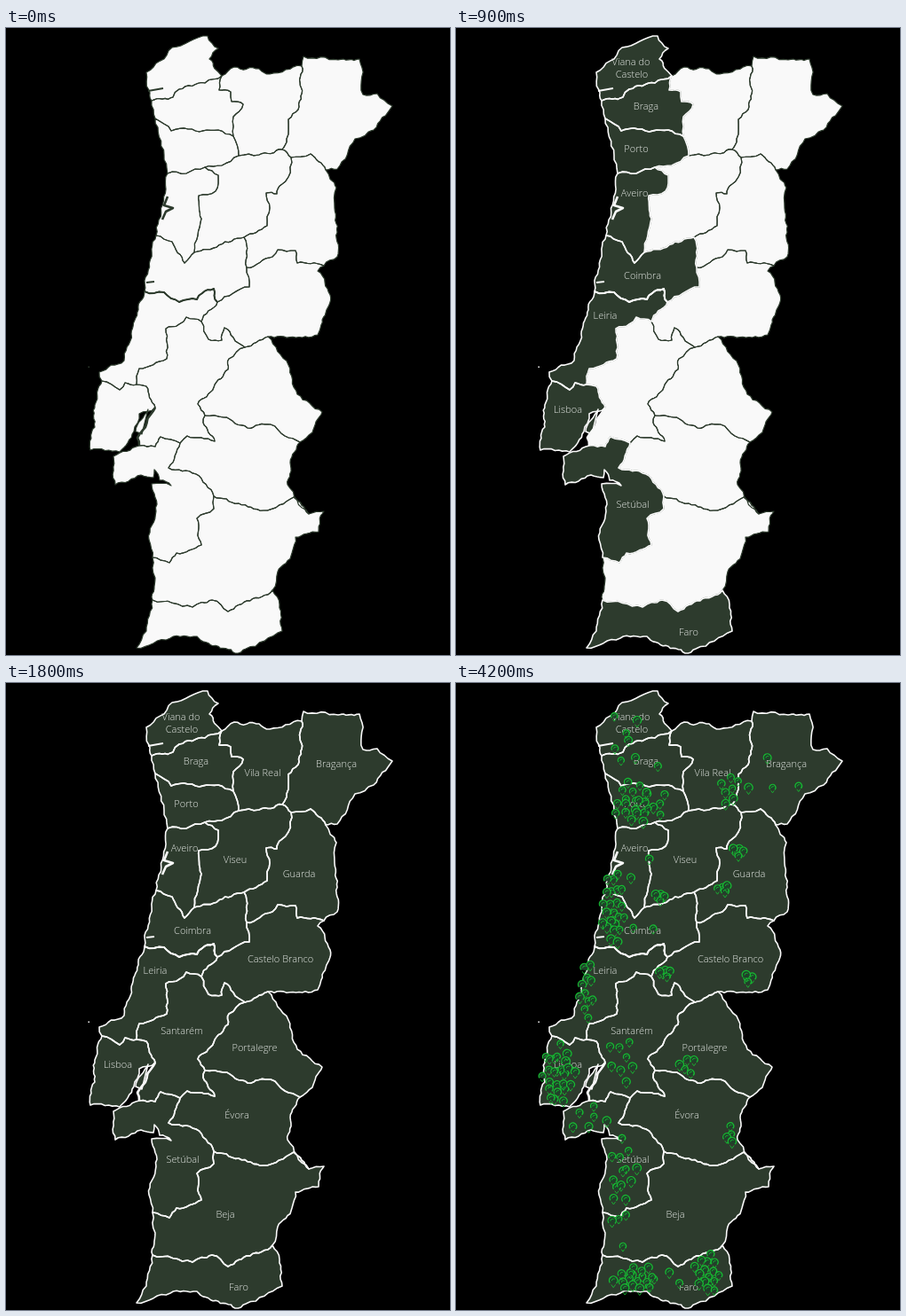
Write an HTML page with a canvas that moves like this. It is 500 px wide and 707 px high and loops after 4.5 s.

```html
<!DOCTYPE html>
<html lang="pt">
<head>
<meta charset="utf-8">
<style>
  html, body { margin: 0; width: 100%; height: 100%; overflow: hidden; background: #000; }
  canvas { display: block; }
</style>
</head>
<body>
<canvas id="stage" width="500" height="707"></canvas>
<script>
const ctx = document.getElementById('stage').getContext('2d');
const DARK = '#2d3b2d', LIGHT = '#f9f9f9', GREEN = '#17b832';
const STEP = 300, STEPS = 15;
const arcs = {}, regions = [], waters = [], pins = [];

const parse = text => text.split(' ').map(p => p.split(',').map(Number));
const same = (a, b) => a[0] === b[0] && a[1] === b[1];

// Splits a segment again and again, shifting each midpoint sideways a little.
function roughen([x0, y0], [x1, y1]) {
  const length = Math.hypot(x1 - x0, y1 - y0);
  if (length < 6) return [[x1, y1]];
  const shift = Math.sin(x0 * 12.9 + y1 * 78.2) * Math.min(0.13, 1.6 / length);
  const mid = [(x0 + x1) / 2 - (y1 - y0) * shift, (y0 + y1) / 2 + (x1 - x0) * shift];
  return [...roughen([x0, y0], mid), ...roughen(mid, [x1, y1])];
}

function arc(name, text) {
  const points = parse(text);
  arcs[name] = points.flatMap((p, i) => i ? roughen(points[i - 1], p) : [p]);
}

function toPath(points) {
  const path = new Path2D();
  points.forEach(([x, y]) => path.lineTo(x, y));
  return path;
}

// Joins arcs into one outline, turning each to continue the last.
function region(step, names, ...labels) {
  const outline = [];
  for (const name of names.split(' ')) {
    const points = arcs[name], end = outline[outline.length - 1];
    outline.push(...(end && !same(end, points[0]) ? [...points].reverse() : points));
  }
  const path = toPath(outline);
  path.closePath();
  regions.push({ step, path, labels });
}

// Rivers and inlets, which turn light together with their district.
const water = (step, width, points) => waters.push({ step, width, path: toPath(points) });

// Spreads pins over an ellipse on a golden-angle spiral, dealt out over the steps.
function scatter(first, last, count, x, y, rx, ry) {
  for (let i = 0; i < count; i++) {
    const angle = i * 2.4 + x, far = Math.sqrt((i + 0.5) / count);
    pins.push({
      step: first + i % (last - first + 1),
      x: x + rx * far * Math.cos(angle),
      y: y + ry * far * Math.sin(angle),
      r: 3.5 + i * 0.618 % 1 * 1.3
    });
  }
}
const early = (...cluster) => scatter(7, 9, ...cluster);
const late = (...cluster) => scatter(10, 14, ...cluster);

// Coast and frontier
arc('vianaSea', '164,82 161,70 158,50 187,22 227,9 239,23 229,35 243,54');
arc('vilaTop', '243,54 257,44 285,46 297,52 333,43');
arc('bragancaTop', '333,43 335,32 374,36 398,35 402,75 418,74 435,88 414,115 393,125 373,159 360,160');
arc('guardaEast', '360,160 372,180 370,203 373,258 358,268');
arc('casteloEast', '358,268 351,274 365,301 351,346 295,348');
arc('portalegreEast', '295,348 318,380 328,413 356,433 345,456 331,467');
arc('evoraEast', '331,467 320,490 317,515 341,548');
arc('bejaEast', '300,634 306,613 322,592 326,574 352,568 358,545 341,548');
arc('faroSea', '300,634 308,650 311,680 270,700 258,705 215,686 185,688 147,699 158,680 165,645');
arc('bejaSea', '165,597 168,620 165,645');
arc('setubalSea', '165,597 161,577 169,545 164,514 186,516 173,510 167,498 166,507 152,504 123,515 121,483 150,471');
arc('lisboaSea', '168,428 150,435 144,455 128,478 95,476 100,450 100,425 108,398');
arc('leiriaSea', '108,398 105,388 133,375 141,345 156,297');
arc('coimbraSea', '156,297 169,234');
arc('aveiroSea', '169,234 182,164');
arc('portoSea', '182,164 178,143 168,102');
arc('bragaSea', '168,102 164,82');

// Inner borders
arc('vianaBraga', '164,82 188,78 195,69 224,62 243,54');
arc('bragaVila', '243,54 240,70 253,72 254,83 267,86 256,100 256,122');
arc('bragaPorto', '168,102 186,116 205,114 239,115 256,122');
arc('portoVila', '256,122 262,144');
arc('portoViseu', '224,157 243,155 262,144');
arc('portoAveiro', '182,164 203,164 224,157');
arc('vilaViseu', '262,144 285,143 311,137');
arc('vilaBraganca', '333,43 329,92 318,103 316,125 311,137');
arc('viseuBraganca', '311,137 321,146');
arc('guardaBraganca', '321,146 343,142 360,160');
arc('viseuGuarda', '321,146 318,168 305,187 293,186 297,203 294,223 268,236');
arc('aveiroViseu', '224,157 239,166 236,184 217,189 220,215 212,253');
arc('aveiroCoimbra', '169,234 187,241 201,265 212,253');
arc('coimbraViseu', '212,253 268,236');
arc('guardaCoimbra', '268,236 271,270');
arc('guardaCastelo', '271,270 300,258 306,250 326,251 328,265 358,268');
arc('coimbraCastelo', '271,270 274,292 238,309');
arc('coimbraLeiria', '156,297 178,298 195,309 215,306 221,299 234,294 238,309');
arc('leiriaCastelo', '238,309 220,331');
arc('leiriaSantarem', '220,331 203,326 195,334 180,339 181,373 150,384 147,402');
arc('leiriaLisboa', '108,398 128,408 134,400 147,402');
arc('lisboaSantarem', '147,402 158,404 168,428');
arc('tejo', '168,428 148,462 150,471');
arc('island', '160,430 146,455 153,458');
arc('casteloSantarem', '220,331 228,351 243,352 246,338 256,349 269,360');
arc('casteloPortalegre', '269,360 295,348');
arc('santaremPortalegre', '224,437 216,424 250,385 251,373 269,360');
arc('santaremSetubal', '150,471 168,472 174,461 196,468');
arc('santaremEvora', '196,468 204,460 235,466 222,445 224,437');
arc('portalegreEvora', '224,437 245,439 272,451 298,447 314,460 331,467');
arc('setubalEvora', '196,468 183,496 214,503 234,528');
arc('setubalBeja', '234,528 234,542 215,553 220,583 192,592 184,603 165,597');
arc('evoraBeja', '234,528 290,544 324,529 341,548');
arc('bejaFaro', '165,645 210,653 232,645 250,658 300,634');

region(1, 'bragaPorto portoVila portoViseu portoAveiro portoSea', ['Porto', 203, 137]);
region(1, 'leiriaLisboa lisboaSantarem lisboaSea', ['Lisboa', 126, 431]);
region(1, 'island');
region(1, 'bejaFaro faroSea', ['Faro', 262, 682]);
region(2, 'vianaSea vianaBraga', ['Viana do', 197, 39], ['Castelo', 198, 53]);
region(2, 'vianaBraga bragaVila bragaPorto bragaSea', ['Braga', 214, 89]);
region(2, 'portoAveiro aveiroViseu aveiroCoimbra aveiroSea', ['Aveiro', 201, 187]);
region(3, 'aveiroCoimbra coimbraViseu guardaCoimbra coimbraCastelo coimbraLeiria coimbraSea', ['Coimbra', 210, 280]);
region(3, 'coimbraLeiria leiriaCastelo leiriaSantarem leiriaLisboa leiriaSea', ['Leiria', 168, 325]);
region(3, 'santaremSetubal setubalEvora setubalBeja setubalSea', ['Setúbal', 199, 538]);
region(4, 'vilaViseu viseuBraganca viseuGuarda coimbraViseu aveiroViseu portoViseu', ['Viseu', 258, 200]);
region(4, 'leiriaSantarem lisboaSantarem tejo santaremSetubal santaremEvora santaremPortalegre casteloSantarem', ['Santarém', 198, 393]);
region(4, 'setubalBeja bejaSea bejaFaro bejaEast evoraBeja', ['Beja', 247, 600]);
region(5, 'vilaTop vilaBraganca vilaViseu portoVila bragaVila', ['Vila Real', 289, 102]);
region(5, 'guardaCastelo casteloEast casteloPortalegre casteloSantarem leiriaCastelo coimbraCastelo', ['Castelo Branco', 309, 312]);
region(5, 'portalegreEvora evoraEast evoraBeja setubalEvora santaremEvora', ['Évora', 260, 488]);
region(6, 'bragancaTop guardaBraganca viseuBraganca vilaBraganca', ['Bragança', 372, 92]);
region(6, 'guardaBraganca guardaEast guardaCastelo guardaCoimbra viseuGuarda', ['Guarda', 330, 216]);
region(6, 'casteloPortalegre portalegreEast portalegreEvora santaremPortalegre', ['Portalegre', 280, 412]);

water(1, 2.6, arcs.tejo);
water(2, 2, parse('160,71 177,68'));
water(2, 2.6, parse('182,190 178,200 188,203 180,207 176,216'));
water(3, 2, arcs.coimbraLeiria);
water(3, 2, parse('158,287 167,286'));

early(14, 200, 136, 25, 22);
early(11, 112, 443, 18, 28);
early(10, 235, 670, 65, 15);
early(6, 184, 590, 12, 50);
early(3, 197, 80, 45, 22);
early(5, 203, 255, 30, 70);
late(6, 193, 70, 22, 48);
late(9, 215, 137, 28, 20);
late(7, 308, 118, 12, 20);
late(4, 360, 105, 35, 38);
late(5, 317, 190, 7, 7);
late(4, 300, 232, 7, 6);
late(5, 229, 241, 6, 6);
late(22, 177, 253, 14, 42);
late(11, 147, 345, 9, 34);
late(5, 235, 327, 7, 6);
late(4, 330, 333, 7, 5);
late(14, 118, 442, 18, 36);
late(6, 150, 492, 26, 16);
late(8, 188, 425, 18, 28);
late(5, 260, 432, 10, 14);
late(4, 308, 508, 6, 11);
late(11, 188, 552, 18, 40);
late(14, 202, 672, 22, 14);
late(14, 284, 665, 14, 23);

function drawPin({ x, y, r }) {
  ctx.fillStyle = '#20402a';
  ctx.strokeStyle = GREEN;
  ctx.lineWidth = 1.3;
  ctx.beginPath();
  ctx.arc(x, y, r, Math.PI * 0.8, Math.PI * 2.25);
  ctx.fill();
  ctx.stroke();
  ctx.lineWidth = 0.9;
  ctx.beginPath();
  ctx.arc(x + 0.5, y + 0.5, r * 0.5, Math.PI, Math.PI * 1.7);
  ctx.moveTo(x - r * 0.5, y + r);
  ctx.lineTo(x, y + r * 1.7);
  ctx.lineTo(x + r * 0.5, y + r);
  ctx.stroke();
}

function paint(list, fill, stroke, width) {
  ctx.fillStyle = fill;
  ctx.strokeStyle = stroke;
  ctx.lineWidth = width;
  list.forEach(({ path }) => ctx.fill(path));
  list.forEach(({ path }) => ctx.stroke(path));
}

function draw(step) {
  const isOn = item => item.step <= step;
  const on = regions.filter(isOn);
  ctx.clearRect(0, 0, 500, 707);
  ctx.lineJoin = 'round';
  paint(regions.filter(r => !isOn(r)), LIGHT, DARK, 1.2);
  paint(on, DARK, LIGHT, 1.6);
  for (const w of waters) {
    ctx.strokeStyle = isOn(w) ? LIGHT : DARK;
    ctx.lineWidth = w.width;
    ctx.stroke(w.path);
  }
  ctx.fillStyle = step ? LIGHT : DARK;
  ctx.fillRect(92.5, 381.5, 1.5, 1.5);

  ctx.font = '300 11px "Open Sans", "Noto Sans", sans-serif';
  ctx.textAlign = 'center';
  ctx.textBaseline = 'middle';
  ctx.fillStyle = '#e4e8e4';
  on.forEach(r => r.labels.forEach(label => ctx.fillText(...label)));
  pins.filter(isOn).forEach(drawPin);
}

let shown = -1;
function tick(now) {
  const step = Math.floor(now / STEP) % STEPS;
  if (step !== shown) draw(shown = step);
  requestAnimationFrame(tick);
}
draw(shown = 0);
requestAnimationFrame(tick);
</script>
</body>
</html>
```
